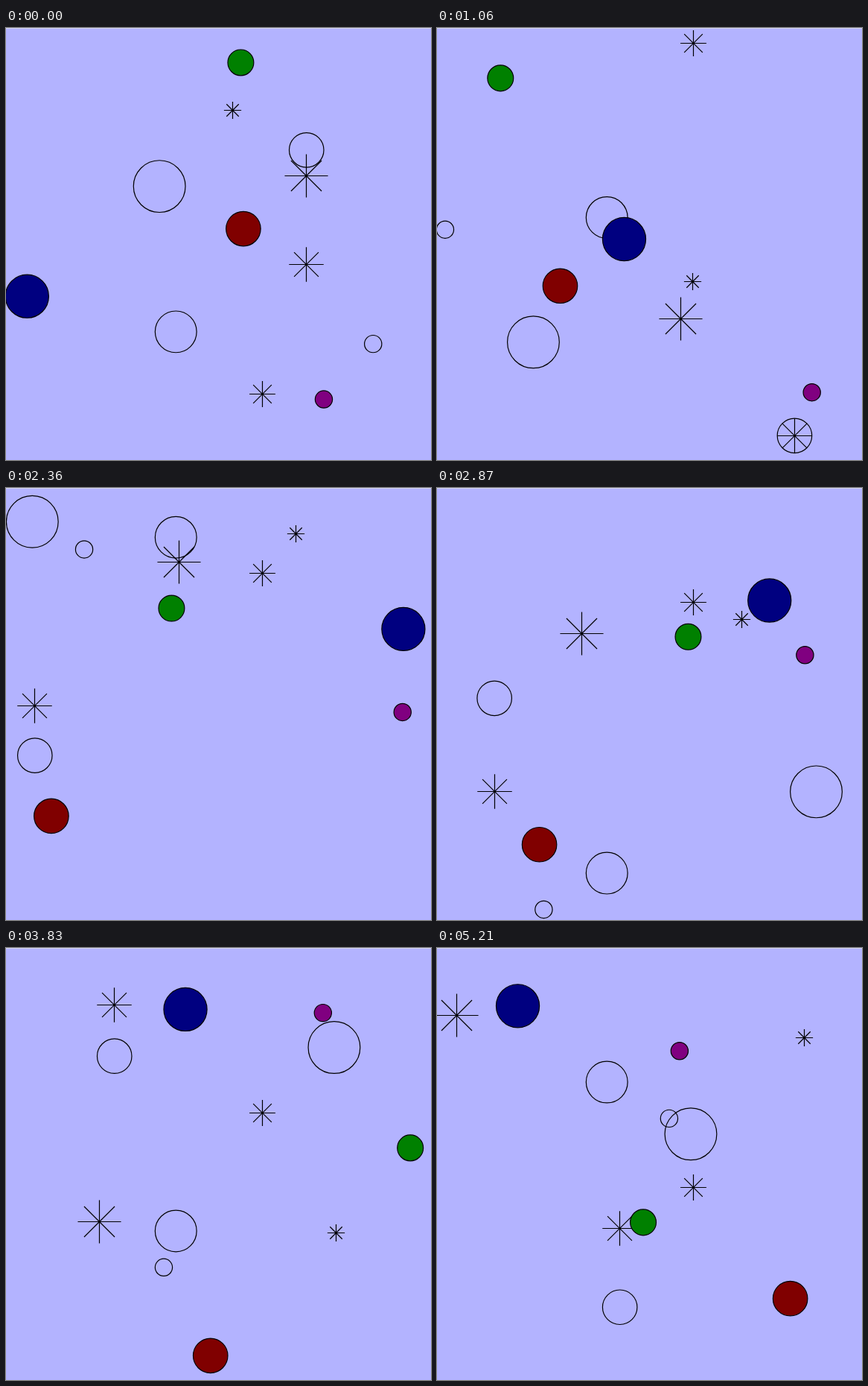
Recreate the animation shown at these times as an HTML page with a canvas. Size 571 px wide and 580 px high, loop 5240 ms.

```html
<!DOCTYPE html>
<html lang="en">
<head>
<meta charset="utf-8">
<title>Drifting shapes</title>
<style>
html, body { margin: 0; width: 100%; height: 100%; overflow: hidden; background: #b3b3ff; }
canvas { display: block; }
</style>
</head>
<body>
<canvas id="stage" width="571" height="580"></canvas>
<script>
const ctx = document.getElementById('stage').getContext('2d');
const W = 571, H = 580, LOOP = 5240;

// The shapes live in a square world of 500 units, seen slightly cropped.
const WORLD = 500, SCALE = 1.1622, LEFT = -4.2, TOP = 1.1;

// Time (ms) to picture number, then picture number to simulation ticks.
const CLOCK = [[0, 0], [30, 1], [560, 17], [1090, 33], [1630, 50], [2160, 66],
  [2710, 83], [3240, 99], [3770, 115], [4320, 132], [4870, 148], [5240, 159]];
const TICKS = [[0, 0], [32, 66], [57, 116], [88, 180], [117, 239], [140, 288], [158, 325]];

// Start position, radius and velocity per tick, in world units.
const rings = [
  { x: 181, y: 182, r: 30, vx: -1, vy: -4 },
  { x: 351, y: 140, r: 20, vx: 1, vy: -2 },
  { x: 200, y: 350, r: 24, vx: 0, vy: -2 },
  { x: 428, y: 364, r: 10, vx: 1, vy: -2 }
];
const stars = [
  { x: 266, y: 94, r: 10, vx: 0.5, vy: 3 },
  { x: 351, y: 170, r: 25, vx: -1, vy: 2.5 },
  { x: 351, y: 272, r: 20, vx: 1, vy: 3 },
  { x: 300, y: 422, r: 15, vx: 0, vy: 1 }
];
const balls = [
  { x: 28, y: 309, r: 25, vx: -3, vy: -1, fill: '#000080' },
  { x: 275, y: 39, r: 15, vx: -3, vy: -1, fill: '#008000' },
  { x: 278, y: 231, r: 20, vx: -2, vy: 1, fill: '#800000' },
  { x: 371, y: 428, r: 10, vx: 1, vy: 2, fill: '#800080' }
];

function lerpTable(table, v) {
  let i = 1;
  while (i < table.length - 1 && v > table[i][0]) i++;
  const [a, p] = table[i - 1], [b, q] = table[i];
  return p + (q - p) * (v - a) / (b - a);
}

// Edge rules take and return [position, velocity] on one axis.
function wrap(p, v, lo, hi) {
  return [p < lo ? hi : p > hi ? lo : p, v];
}

function bounce(p, v, lo, hi) {
  if (p <= lo) return [lo, Math.abs(v)];
  if (p >= hi) return [hi, -Math.abs(v)];
  return [p, v];
}

function travel(p, v, r, ticks, edge) {
  for (let i = 0; i < ticks; i++) [p, v] = edge(p + v, v, r, WORLD - r);
  return Math.floor(p);
}

function place(s, ticks, edge) {
  return [
    LEFT + SCALE * travel(s.x, s.vx, s.r, ticks, edge),
    TOP + SCALE * travel(s.y, s.vy, s.r, ticks, edge),
    SCALE * s.r
  ];
}

function circle(x, y, r, fill) {
  ctx.beginPath();
  ctx.arc(x, y, r, 0, 2 * Math.PI);
  if (fill) {
    ctx.fillStyle = fill;
    ctx.fill();
  }
  ctx.stroke();
}

function star(x, y, r) {
  x = Math.floor(x) + 0.5;
  y = Math.floor(y) + 0.5;
  ctx.beginPath();
  for (let i = 0; i < 4; i++) {
    const dx = r * Math.cos(i * Math.PI / 4), dy = r * Math.sin(i * Math.PI / 4);
    ctx.moveTo(x - dx, y - dy);
    ctx.lineTo(x + dx, y + dy);
  }
  ctx.stroke();
}

function draw(ms) {
  const picture = Math.floor(lerpTable(CLOCK, ms) + 0.2);
  const ticks = Math.round(lerpTable(TICKS, Math.min(picture, 158)));
  ctx.fillStyle = '#b3b3ff';
  ctx.fillRect(0, 0, W, H);
  ctx.fillStyle = '#d4d4f2';
  ctx.fillRect(0, 0, W, 1);
  ctx.strokeStyle = '#000';
  ctx.lineWidth = 1.2;
  for (const s of rings) circle(...place(s, ticks, wrap));
  for (const s of stars) star(...place(s, ticks, wrap));
  for (const s of balls) circle(...place(s, ticks, bounce), s.fill);
}

let start = null;
function frame(now) {
  if (start === null) start = now;
  draw((now - start) % LOOP);
  requestAnimationFrame(frame);
}
draw(0);
requestAnimationFrame(frame);
</script>
</body>
</html>
```
